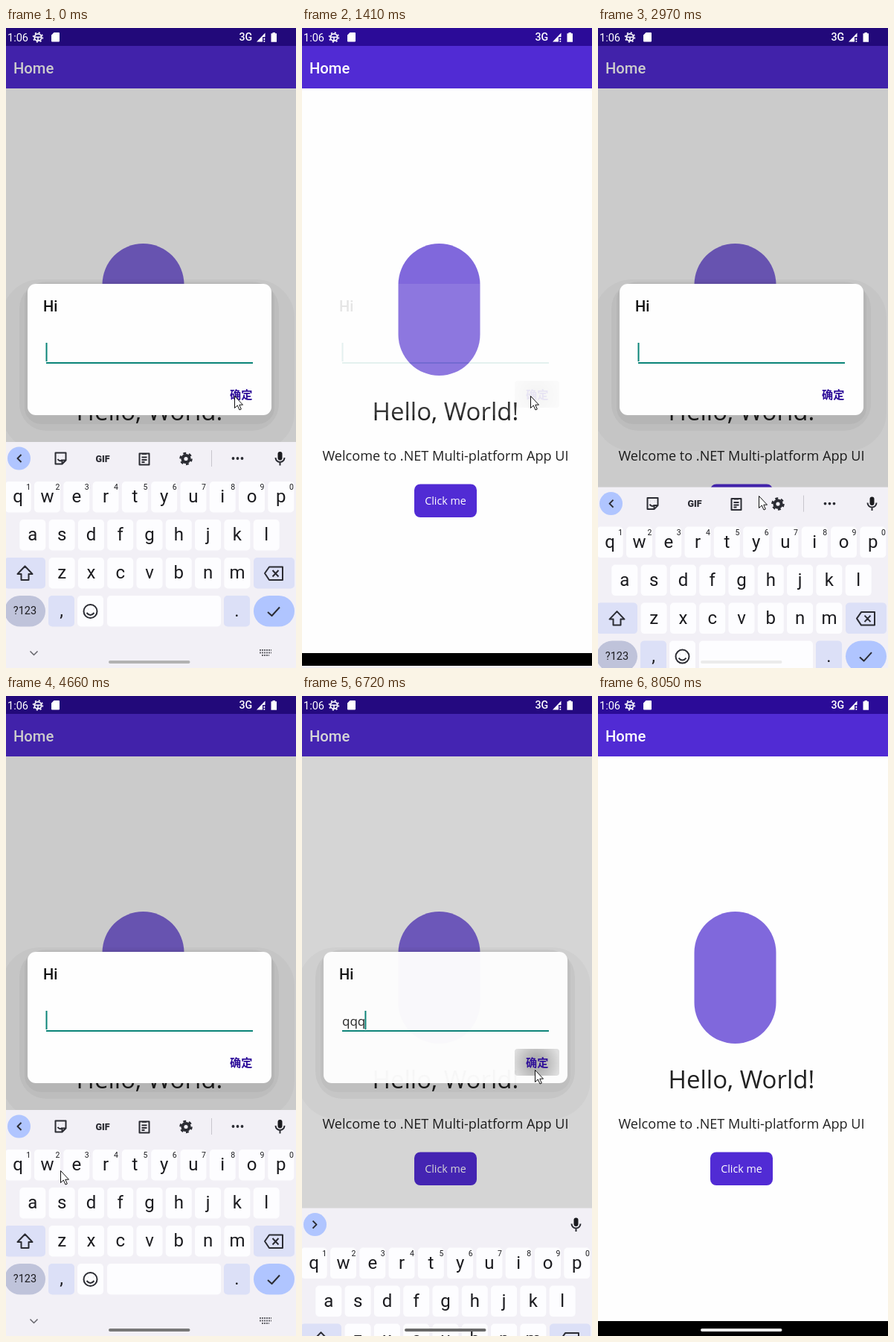
An HTML page for the animation above (8750 ms loop, 390 by 858 pixels).

```html
<!DOCTYPE html>
<html lang="zh-Hans">
<head>
<meta charset="utf-8">
<title>Prompt dialog</title>
<style>
html, body { margin: 0; width: 100%; height: 100%; overflow: hidden; background: #000; }
svg { display: block; width: 390px; height: 858px; }
text { font-family: Roboto, sans-serif; white-space: pre; }
.page text, #typed { font-family: "Open Sans", sans-serif; }
.page .bar { font-family: Roboto, sans-serif; }
.mid, #keys text { text-anchor: middle; }
.line { fill: none; stroke: #2b2c33; stroke-width: 2; stroke-linejoin: round; }
</style>
</head>
<body>
<svg viewBox="0 0 390 858">
  <defs>
    <radialGradient id="tapGlow" gradientUnits="userSpaceOnUse" cx="208" cy="634" r="48">
      <stop offset=".6" stop-color="#fff" stop-opacity=".18"/>
      <stop offset="1" stop-color="#fff" stop-opacity="0"/>
    </radialGradient>
    <radialGradient id="okGlow" gradientUnits="userSpaceOnUse" cx="315" cy="492" r="32">
      <stop offset=".3" stop-opacity=".3"/>
      <stop offset="1" stop-opacity=".12"/>
    </radialGradient>
  </defs>

  <g class="page">
    <rect width="390" height="858" fill="#fefefe"/>
    <rect width="390" height="24" fill="#2b0b98"/>
    <rect y="24" width="390" height="57" fill="#512bd4"/>
    <text class="bar" x="10" y="61" font-size="20.2" font-weight="500" fill="#fff">Home</text>
    <rect x="129.5" y="289" width="110" height="177" rx="55" fill="#8068dc"/>
    <g class="mid" fill="#212121">
      <text x="193" y="526" font-size="33">Hello, World!</text>
      <text x="193" y="580" font-size="18.1">Welcome to .NET Multi-platform App UI</text>
      <rect x="151" y="611.5" width="84" height="44.5" rx="8" fill="#512bd4"/>
      <text x="193" y="639" font-size="14.3" fill="#fff">Click me</text>
    </g>
    <rect id="tap" x="151" y="611.5" width="84" height="44.5" rx="8" fill="url(#tapGlow)"/>
  </g>
  <rect id="dim" width="390" height="858"/>
  <rect y="838" width="390" height="20"/>

  <g fill="#fff">
    <text x="2" y="18" font-size="14.5">1:06</text>
    <text x="313.5" y="17" font-size="14.2" font-weight="500">3G</text>
    <circle cx="43" cy="12.5" r="4.7" fill="none" stroke="#fff" stroke-width="1.7"/>
    <circle cx="43" cy="12.5" r="6.4" fill="none" stroke="#fff" stroke-width="1.6" stroke-dasharray="2 3.03"/>
    <path d="M39 11.5h8v1.6h-3.2v4h-1.600v-4H39zM64.500 6H71a1 1 0 0 1 1 1v10.500a1 1 0 0 1-1 1h-9a1 1 0 0 1-1-1V9.500z"/>
    <path d="M337 18.5L348.5 6.5V12H345V18.5zM346.5 13.5h1.7V16h-1.7zM346.5 17h1.7v1.7h-1.7zM358.5 6H362v1.3h2v11.5h-7.500V7.300h2z"/>
  </g>

  <g id="shadow">
    <rect x="-6" y="337" width="394" height="230" rx="52" fill-opacity=".03"/>
    <rect x="18" y="340" width="349" height="200" rx="36" fill-opacity=".04"/>
    <rect x="25" y="342" width="336" height="189" rx="22" fill-opacity=".045"/>
  </g>
  <g id="dialog">
    <rect x="29" y="343" width="328" height="176" rx="11" fill="#fefefe"/>
    <text x="50" y="380" font-size="20" font-weight="500" fill="#111">Hi</text>
    <text id="typed" x="54" y="442" font-size="17" fill="#222"></text>
    <rect id="rule" x="54" y="448" width="278"/>
    <rect id="caret" y="422" width="2" height="25" fill="#0a8478"/>
    <rect id="ok" x="286" y="473" width="60" height="36" rx="4" fill="url(#okGlow)"/>
    <text x="301" y="497" font-size="15.2" font-weight="700" fill="#2b0b98" style="font-family:'Noto Sans CJK SC','Noto Sans CJK',sans-serif">确定</text>
  </g>

  <g id="board">
    <rect y="555" width="390" height="320" fill="#f2f0f6"/>
    <circle cx="17.5" cy="577" r="15.5" fill="#b0c5ff"/>
    <path id="arrow" class="line" d="M3 -5L-2 0L3 5"/>
    <g id="tools">
      <path class="line" d="M66.5 569.5h14v10l-5 5h-9zM80.5 579.5h-5v5M69.5 578q3 4 6 1M70.5 574h.1M76 574h.1"/>
      <text class="mid" x="130" y="581.5" font-size="12.5" font-weight="900" fill="#2b2c33">GIF</text>
      <path class="line" d="M179.5 570.5h13v15h-13zM183 571h6M182.5 575.5h7M182.5 579h7M182.5 582h4"/>
      <circle class="line" cx="242" cy="577.5" r="4.6" style="stroke-width:4"/>
      <circle class="line" cx="242" cy="577.5" r="7.5" style="stroke-width:2.5" stroke-dasharray="3.9 3.95"/>
      <path d="M276.5 566v22" stroke="#c8c6cd"/>
      <path d="M305.5 577h13" stroke="#2b2c33" stroke-width="3.8" stroke-linecap="round" stroke-dasharray="0 6"/>
    </g>
    <rect x="365.5" y="568" width="6" height="11.5" rx="3" fill="#1b1b1f"/>
    <path class="line" d="M362.5 576a6 6 0 0 0 12 0M368.5 582v4.5"/>
    <g id="keys" fill="#1b1b1f"></g>
    <path class="line" d="M15.5 732L25.5 721.5L35.5 732H30.5V740H20.5V732z"/>
    <path class="line" d="M348 731L354 722.5H372V740H354zM358.5 727L366.5 735.5M366.5 727L358.5 735.5"/>
    <circle class="line" cx="113.5" cy="782" r="9"/>
    <path class="line" d="M108.5 784q5 6 10 0M110 779h.1M117 779h.1"/>
    <path class="line" d="M352 783L357.5 788L368 776.5"/>
    <path class="line" d="M32.5 835.5L37.5 840.5L42.5 835.5" style="stroke:#66666c;stroke-width:1.5"/>
    <path d="M341 834h16M341 837.5h16M344 841h10" stroke="#66666c" stroke-width="2" stroke-dasharray="2 1"/>
  </g>
  <rect id="home" x="138" y="848" width="109.5" height="4" rx="2"/>
  <path id="mouse" d="M.5 .5V16.5L4.3 13L7 19L9.3 18L6.800 12.200H11.500z" fill="#fff" stroke="#111"/>
</svg>
<script>
const $ = id => document.getElementById(id);
const set = (id, attrs) => {
  for (const name in attrs) $(id).setAttribute(name, attrs[name]);
};
const clamp = v => Math.min(1, Math.max(0, v));
const smooth = v => v * v * (3 - 2 * v);
const mix = (a, b, v) => a + (b - a) * v;

const LOOP = 8750, STEP = 140;

// Keyboard
const WHITE = '#fdfdff', PALE = '#dce0f7', PITCH = 39.3;
let keys = '';
function key(x, y, w, fill, label = '', size = 24, rx = 5) {
  keys += `<rect x="${x}" y="${y}" width="${w}" height="41.5" rx="${rx}" fill="${fill}"/>` +
    `<text x="${x + w / 2}" y="${y + 20.5 + size * .33}" font-size="${size}">${label}</text>`;
}
['qwertyuiop', 'asdfghjkl', 'zxcvbnm'].forEach((row, r) => {
  [...row].forEach((c, i) => {
    const x = 193 + PITCH * (i - (row.length - 1) / 2), y = 608 + 51 * r;
    key(x - 17.5, y, 35, WHITE, c);
    if (!r) keys += `<text x="${x + 14}" y="619" font-size="10.5">${(i + 1) % 10}</text>`;
  });
});
key(-2, 710, 55, PALE);
key(333, 710, 55, PALE);
key(-2, 761, 55, '#bfc3da', '?123', 14.5, 21);
key(57, 761, 35, PALE, ',');
key(96, 761, 35, WHITE);
key(136, 761, 153, WHITE);
key(293, 761, 35, PALE, '.');
key(333, 761, 55, '#b0c5ff', '', 24, 21);
$('keys').innerHTML = keys;

// Opening and closing alternate; the first opening is before the loop
const EVENTS = [-840, 1270, 2400, 6720];
const TYPES = [4920, 5185, 5450];
const FOCUS = [-70, 2640, ...TYPES];

// Pointer rests: arrival, departure, x, y
const RESTS = [
  [0, 1410, 307, 493], [2100, 3000, 216, 627], [3390, 4250, 330, 510], [4640, 4640, 73, 636],
  [4780, 5800, 14, 622], [6410, 6720, 313, 501], [7980, LOOP, 290, 870]
];
function pointer(t) {
  const i = RESTS.findLastIndex(r => r[0] <= t);
  const [, leave, x, y] = RESTS[i];
  if (t <= leave) return [x, y];
  const [arrive, , x2, y2] = RESTS[i + 1];
  const v = smooth((t - leave) / (arrive - leave));
  return [mix(x, x2, v), mix(y, y2, v)];
}

function opening(age) {
  const p = clamp(age / 240);
  return {
    dark: p,
    alpha: 1 - (1 - p) ** 1.7,
    zoom: mix(.94, 1, p),
    slide: 303 * (1 - clamp((age - 280) / 350)),
    tap: 1 - clamp((age - STEP) / 280),
    press: 0,
    gray: mix(235, 120, clamp((age - 570) / 540)),
    plain: p < 1
  };
}

function closing(age) {
  const p = (age + 70) / 210;
  return {
    dark: 1 - clamp(p) ** 1.5,
    alpha: p > 1 ? 0 : 1 - .9 * p ** 3,
    zoom: 1,
    slide: 300 * p ** .75,
    tap: 0,
    press: 1,
    gray: age < STEP ? 105 : 235 * clamp((age - 660) / 600),
    plain: false
  };
}

function draw(time) {
  // The screen refreshes in steps counted from the latest event
  const e = EVENTS.findLastIndex(at => at <= time);
  const age = Math.floor((time - EVENTS[e]) / STEP) * STEP;
  const t = EVENTS[e] + age;
  const s = e % 2 ? closing(age) : opening(age);
  const n = TYPES.filter(at => at <= t).length;
  const focus = FOCUS.findLast(at => at <= t);

  set('mouse', { transform: `translate(${pointer(t)})` });
  set('dim', { opacity: .2 * s.dark });
  set('tap', { opacity: s.tap });
  set('ok', { opacity: s.press });
  set('shadow', { opacity: s.alpha ** 1.5 });
  set('dialog', {
    opacity: s.alpha,
    transform: `translate(193 431) scale(${s.zoom}) translate(-193 -431)`
  });
  set('rule', { fill: s.plain ? '#777' : '#0a8478', height: s.plain ? 1 : 2 });
  $('typed').textContent = 'q'.repeat(n);
  set('caret', {
    x: 53.5 + 10.3 * n,
    opacity: !s.plain && (t - focus) % 1000 < 500 ? 1 : 0
  });
  set('board', { transform: `translate(0 ${s.slide})` });
  set('tools', { opacity: n ? 0 : 1 });
  set('arrow', { transform: `translate(17.5 577) scale(${n ? -1 : 1} 1)` });
  set('home', { fill: `rgb(${s.gray},${s.gray},${s.gray})` });
}

const start = performance.now();
function frame() {
  draw((performance.now() - start) % LOOP);
  requestAnimationFrame(frame);
}
frame();
</script>
</body>
</html>
```
